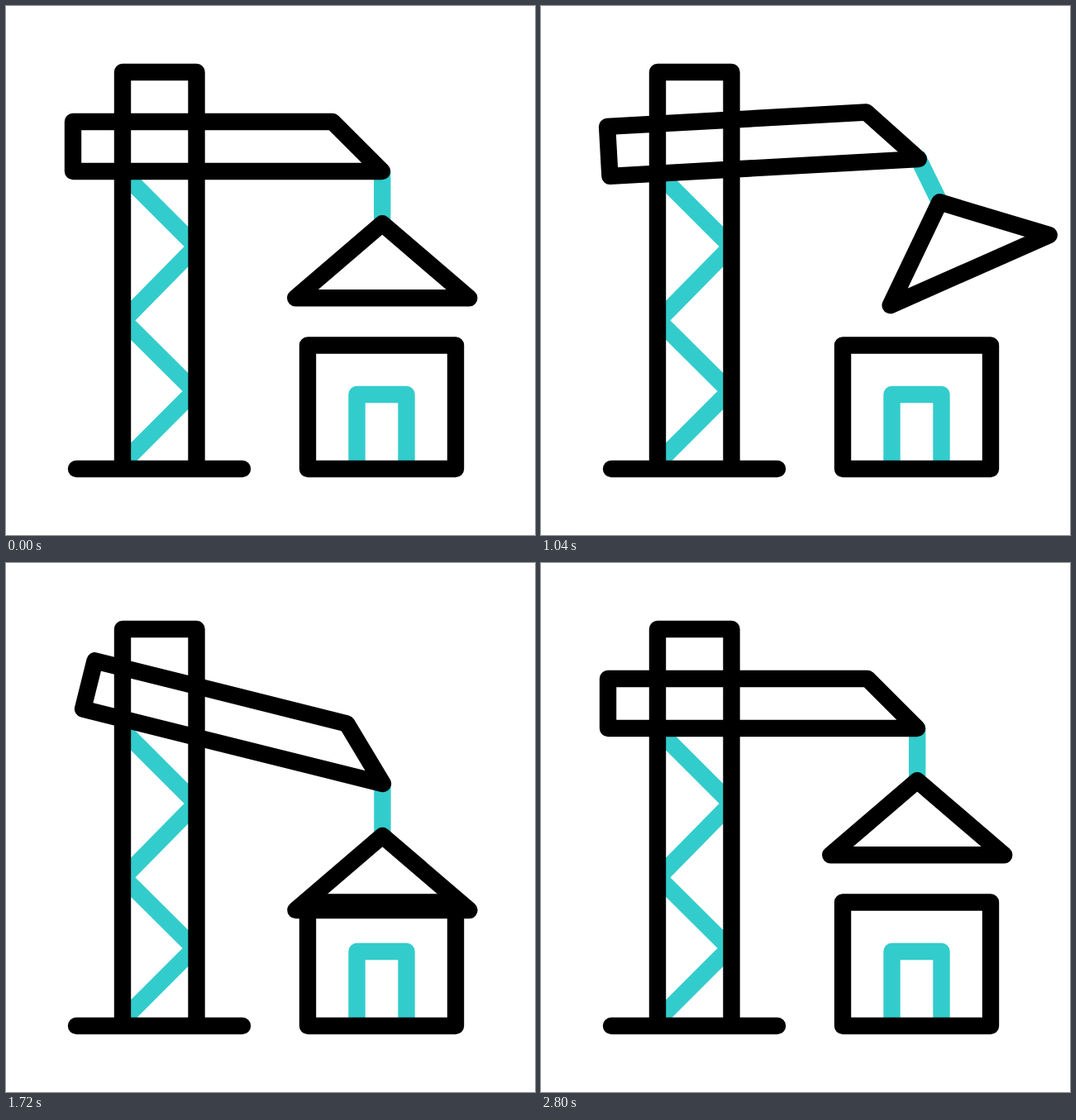
Recreate the animation shown at these times as an HTML page. Size 640 by 640 pixels, loop 3 s.

```html
<!DOCTYPE html>
<html lang="en">
<head>
<meta charset="utf-8">
<title>Crane building a house</title>
<style>
  html, body { margin: 0; width: 100%; height: 100%; overflow: hidden; background: #fff; }
  svg { display: block; width: 100vw; height: 100vh; }
  path { fill: none; stroke: #000; stroke-width: 20.4; stroke-linejoin: round; stroke-linecap: round; }
  .teal { stroke: #3cc; stroke-linecap: butt; }
</style>
</head>
<body>
<svg viewBox="0 0 640 640">
  <path class="teal" d="M141 202 230 291 142 380.5 228 466 141 553"/>
  <path class="teal" d="M424.5 560V470H484.5V560"/>
  <path class="teal" id="cable" d="M0 0V60"/>
  <path id="boom" d="M81 140H395L455 200H81Z"/>
  <path id="roof" d="M0 0 105 90H-105Z"/>
  <path d="M141 560V80H230.5V560M85 560H286"/>
  <path d="M365 410.5H544V560H365Z"/>
</svg>
<script>
const LOOP = 3000, STEP = 40, CABLE = 63.3;
const TIMES = [120, 520, 1000, 1720, 2200, 2800];

// angle, shift x, shift y
const BOOM = [[0, 0, 0], [3.4, 0, 0], [-3.8, 0, 0], [14, 16.2, 2.7]];
// hook x, hook y, cable angle, roof angle
const LOAD = [[455.2, 200, 0, 0], [452, 209, 5.6, 18.5], [454.4, 178.5, -26.7, -24.4], [455.4, 266.7, 0, 0]];

const smooth = s => s * s * (3 - 2 * s);

// Cubic bezier (x1, 0, x2, 1)
function bezier(x, x1, x2) {
  let lo = 0, hi = 1;
  for (let i = 0; i < 24; i++) {
    const s = (lo + hi) / 2, r = 1 - s;
    if (3 * r * r * s * x1 + 3 * r * s * s * x2 + s * s * s < x) lo = s; else hi = s;
  }
  return smooth(lo);
}

function pose(poses, time, x1) {
  const keys = [...poses, poses[3], poses[0]];
  if (time <= TIMES[0] || time >= TIMES[5]) return keys[0];
  const i = TIMES.findIndex(t => t > time) - 1;
  const p = (time - TIMES[i]) / (TIMES[i + 1] - TIMES[i]);
  const f = i === 2 ? bezier(p, x1, .19) : smooth(p);
  return keys[i].map((v, k) => v + (keys[i + 1][k] - v) * f);
}

const place = (id, transform) => document.getElementById(id).setAttribute("transform", transform);

function draw(time) {
  const [angle, dx, dy] = pose(BOOM, time, .18);
  place("boom", `translate(${dx} ${dy}) rotate(${angle} 185.5 170)`);

  const [x, y, swing, tilt] = pose(LOAD, time, .23);
  const a = swing * Math.PI / 180;
  place("cable", `translate(${x} ${y}) rotate(${swing})`);
  place("roof", `translate(${x - CABLE * Math.sin(a)} ${y + CABLE * Math.cos(a)}) rotate(${tilt})`);
}

const start = performance.now();
function tick() {
  const time = (performance.now() - start) % LOOP;
  draw(Math.floor(time / STEP) * STEP);
  requestAnimationFrame(tick);
}
tick();
</script>
</body>
</html>
```
